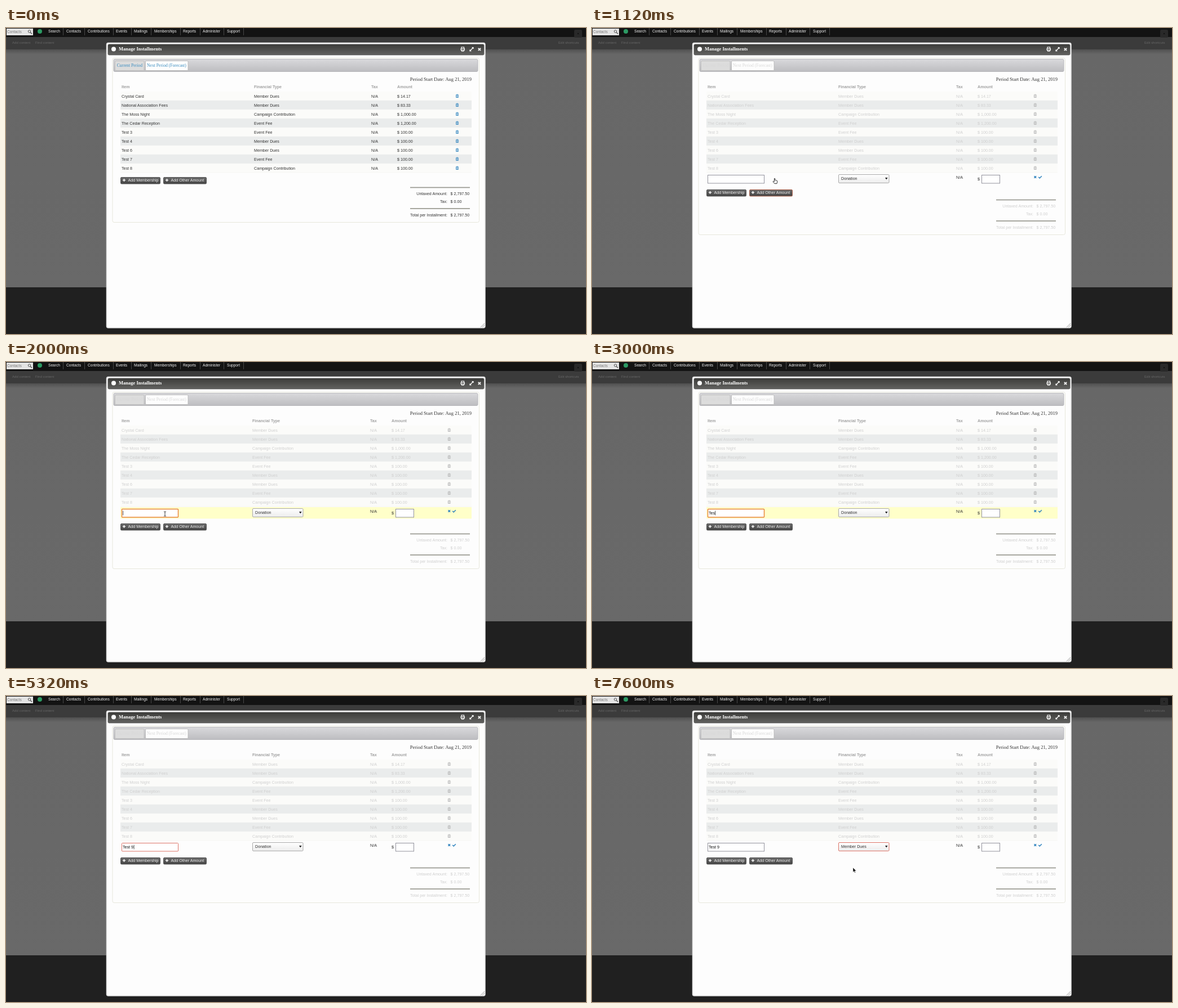
Recreate the animation shown at these times as an HTML page. Size 1029x544 px, loop 8 s.

```html
<!DOCTYPE html>
<html lang="en">
<head>
<meta charset="utf-8">
<title>Manage Installments</title>
<style>
  html, body { margin: 0; height: 100%; overflow: hidden; background: #202020; }
  svg { display: block; width: 100vw; height: 100vh; }
  text { font-family: "Liberation Sans", Arial, sans-serif; font-size: 7.15px; white-space: pre; }
  .serif { font-family: "Liberation Serif", "Times New Roman", serif; }
  .bold { font-weight: bold; }
</style>
</head>
<body>
<svg id="stage" viewBox="0 0 1029 544" preserveAspectRatio="none">
  <defs>
    <linearGradient id="titleFill" x2="0" y2="1"><stop stop-color="#3c3c3a"/><stop offset="1" stop-color="#626260"/></linearGradient>
    <linearGradient id="tabFill" x2="0" y2="1"><stop stop-color="#d9d9dc"/><stop offset="1" stop-color="#bdbdc0"/></linearGradient>
    <linearGradient id="buttonFill" x2="0" y2="1"><stop stop-color="#6c6c6c"/><stop offset="1" stop-color="#424242"/></linearGradient>
    <linearGradient id="selectFill" x2="0" y2="1"><stop stop-color="#fff"/><stop offset="1" stop-color="#ececec"/></linearGradient>
    <linearGradient id="pageFill" x2="0" y2="1"><stop stop-color="#505050"/><stop offset=".02" stop-color="#676767"/><stop offset="1" stop-color="#696969"/></linearGradient>
  </defs>
  <g id="backdrop"></g>
  <g id="dialog"></g>
  <g id="pointer"></g>
</svg>
<script>
const LOOP = 8000;
const BLUE = '#2a80bd', INK = '#333', FADED = '#cfcfcf';

const rows = [
  ['Crystal Card', 'Member Dues', '14.17'],
  ['National Association Fees', 'Member Dues', '83.33'],
  ['The Moss Night', 'Campaign Contribution', '1,000.00'],
  ['The Cedar Reception', 'Event Fee', '1,200.00'],
  ['Test 3', 'Event Fee', '100.00'],
  ['Test 4', 'Member Dues', '100.00'],
  ['Test 6', 'Member Dues', '100.00'],
  ['Test 7', 'Event Fee', '100.00'],
  ['Test 8', 'Campaign Contribution', '100.00'],
];

// [start, typed text, caret offset or -1 when hidden]
const typing = [
  [0, '', -1], [2000, '', 1], [2320, '', -1], [2600, 'T', 4.8], [2840, 'Te', 8.6],
  [3000, 'Tes', 12], [3400, 'Test', 14], [3960, 'Test ', 16], [4600, 'Test ', -1],
  [4760, 'Test 9', 20.3], [6320, 'Test 9', -1],
];

// [start, shape, x, y]
const pointerPath = [
  [0, '', 0, 0], [80, 'arrow', 440, 350], [150, 'arrow', 410, 325], [220, 'arrow', 378, 305],
  [290, 'arrow', 350, 287], [360, 'arrow', 332, 279], [520, 'hand', 325, 272],
  [1200, 'arrow', 324, 268], [1800, 'arrow', 314, 268], [1880, 'beam', 298, 270],
  [1960, 'beam', 282, 270], [2600, '', 0, 0], [5360, 'arrow', 380, 285],
  [5920, 'arrow', 432, 274], [5960, 'arrow', 461, 264], [7480, 'arrow', 462, 290],
  [7540, 'arrow', 463, 305],
];

const at = (steps, t) => steps.findLast(step => step[0] <= t);
const text = (x, y, value, { fill = INK, size = 7.15, cls = '', anchor = 'start' } = {}) =>
  `<text x="${x}" y="${y + size * .35}" class="${cls}" fill="${fill}" text-anchor="${anchor}" style="font-size:${size}px">${value}</text>`;
const box = (x, y, w, h, fill, stroke = 'none', r = 0, line = 1) =>
  `<rect x="${x}" y="${y}" width="${w}" height="${h}" rx="${r}" fill="${fill}" stroke="${stroke}" stroke-width="${line}"/>`;
const path = (d, stroke, width = 1, fill = 'none') =>
  `<path d="${d}" fill="${fill}" stroke="${stroke}" stroke-width="${width}"/>`;
const place = (x, y, content) => `<g transform="translate(${x} ${y})">${content}</g>`;
const dot = (x, y, fill) => `<circle cx="${x}" cy="${y}" r="4" fill="${fill}"/>`;
const cross = (x, y, r, color, width) => place(x, y, path(`M${-r} ${-r}L${r} ${r}M${r} ${-r}L${-r} ${r}`, color, width));

const trash = (x, y, color) => place(x, y,
  path('M-2.6-1.9H2.6M-1-2.8H1', color) + path('M-1.9-1V2.5H1.9V-1M0-1V2', color, .9));

const pointers = {
  '': '',
  arrow: path('M0 0V8.2L1.9 6.5 3.2 9.3 4.5 8.7 3.2 6H5.8Z', '#fff', .5, '#111'),
  beam: path('M-2-4H-.5L0-3.5.5-4H2M0-3.5V3.5M-2 4H-.5L0 3.5.5 4H2', '#222', .9),
  hand: path('M-1.6-4.4Q-.8-5.2-.2-4.3V-1.5L3-.8Q4-.4 3.8.8L3 4.6H-1.2L-4 1.2Q-3.8 0-2.6.6L-1.6 1.3Z', '#222', .9, '#fff'),
};

function button(x, y, w, label, focused) {
  return box(x + .5, y + .5, w - 1, 11.5, 'url(#buttonFill)', focused ? '#b0644e' : '#555', 1.5)
    + path(`M${x + 4} ${y + 5.5}h5m-2.5-2.5v5`, '#fff', 1.4)
    + text(x + 13.5, y + 5.8, label, { fill: '#eee' });
}

function drawBackdrop() {
  const menu = [['Search', 75, 101], ['Contacts', 107, 139], ['Contributions', 145, 190], ['Events', 195, 222],
    ['Mailings', 227, 257], ['Memberships', 263, 309], ['Reports', 314, 344], ['Administer', 349, 386], ['Support', 392, 421]];
  const faint = { fill: '#666', size: 6.05 };
  return box(0, 0, 1029, 16, '#131313') + box(0, 16, 1029, 22, '#3b3b3b')
    + box(0, 38, 1029, 423, 'url(#pageFill)') + box(0, 461, 1029, 83, '#202020')
    + box(1, 1, 47, 12, '#e4e4e4') + text(2, 7, 'Contacts', { fill: '#777', size: 6.5 })
    + '<circle cx="41.5" cy="6" r="2.2" fill="none" stroke="#555"/>' + path('M43 7.5L46 10.5', '#555', 1.3)
    + dot(60, 6, '#2c9a63')
    + menu.map(([label, x, edge]) => text(x, 6, label, { fill: '#f2f2f2', size: 6.58 }) + box(edge, 0, .8, 13, '#555')).join('')
    + text(11, 25.5, 'Add content', faint) + text(52, 25.5, 'Find content', faint) + text(980, 25.5, 'Edit shortcuts', faint)
    + box(1008, 3, 14, 14, '#292929', 'none', 2) + cross(1015, 10, 1.3, '#111', 1);
}

function drawFrame(period) {
  return box(178.5, 26.5, 671.5, 506.5, '#fdfdfd', '#e2e2e2', 3, 1.5)
    + box(181, 29, 667, 19, 'url(#titleFill)', '#4a4a48', 2, .7)
    + dot(191, 37.5, '#fff') + text(200, 37, 'Manage Installments', { fill: '#fff', size: 8.5, cls: 'serif bold' })
    + path('M808 36V34h4.5v2M807.2 40V36.5h6.2V40M808.5 39h3.6v2.2h-3.6Z', '#fff', 1.2)
    + path('M823 41L829 34.5M826.5 34.5H829V37M823 38.5V41H825.5', '#fff', 1.2)
    + cross(840, 38, 2.2, '#fff', 1.7)
    + path('M842 532L849 525M845 532L849 528', '#999', .9)
    + text(826, 91, period, { size: 8.53, cls: 'serif', anchor: 'end' });
}

function drawEditRow(t) {
  const [, typed, caret] = at(typing, t);
  const hovered = t >= 1200 && t < 5320 || t >= 5920 && t < 7600;
  const editing = t >= 2000 && t < 6320;
  const chosen = t >= 7600;
  const ring = hovered ? '#e8863c' : '#dd7468';
  return box(203, 258, 623, 20.5, hovered ? '#ffffc9' : '#fdfdfd')
    + box(205.5, 261.5, 100, 14.5, '#fff', editing ? ring : '#92929c', editing ? 1 : 0, editing && hovered ? 1.5 : 1)
    + text(207, 268.5, typed, { fill: '#111' })
    + (caret < 0 ? '' : box(206.4 + caret, 264.5, .7, 8, '#111'))
    + box(437.5, 260.5, 89.5, 15, 'url(#selectFill)', chosen ? '#dd7468' : '#aaa', 1.5)
    + text(442, 267.5, chosen ? 'Member Dues' : 'Donation')
    + path('M520 266H524.6L522.3 269.6Z', 'none', 0, '#222')
    + text(646, 265, 'N/A') + text(684, 268.5, '$')
    + box(691.5, 261.5, 32, 14.5, '#fff', '#92929c')
    + cross(786.3, 265, 1.8, BLUE, 1.5) + path('M792.2 265L794.2 267 797.8 263.2', BLUE, 1.5);
}

function drawDialog(t) {
  const disabled = t >= 920;
  const open = t >= 1080;
  const shift = open ? 22 : 0;
  const fill = disabled ? FADED : INK;
  const link = disabled ? '#d8d8d8' : '#3b8dc0';
  const [typeX, taxX, amountX, trashX] = open ? [437, 646, 684, 786.3] : [440, 648, 694, 800.5];
  const tab = { fill: link, size: 7.66, cls: 'serif' };
  const head = { fill: '#a0a0a0', cls: 'bold' };

  const table = rows.map(([item, type, amount], i) => {
    const y = 121 + 16 * i;
    return box(203, y - 8, 623, 16, i % 2 ? '#eaecec' : '#fbfbf9')
      + path(`M203 ${y + 8}H826`, '#efefe8', .5)
      + [[205, item], [typeX, type], [taxX, 'N/A'], [amountX, '$ ' + amount]].map(([x, s]) => text(x, y, s, { fill })).join('')
      + trash(trashX, y, disabled ? '#b4b4b4' : BLUE);
  }).join('');

  const totals = [['Untaxed Amount:', '$ 2,797.50', 294.5], ['Tax:', '$ 0.00', 308], ['Total per Installment:', '$ 2,797.50', 332]]
    .map(([label, value, y]) => text(783, y + shift, label, { fill, anchor: 'end' }) + text(788.5, y + shift, value, { fill })).join('');

  return drawFrame('Period Start Date: Aug 21, 2019')
    + box(189, 53.5, 650.5, 292 + shift, 'none', '#e7e7dc', 3)
    + box(191, 55.5, 646, 22, 'url(#tabFill)', '#adadb0', 2, .8)
    + box(193.5, 58.5, 51.5, 17, '#dcdcdc', '#bcbcbc', 1.5, .8) + box(247.5, 58.5, 75.5, 17, '#fdfdfd', '#b4b4b4', 1.5, .8)
    + text(196.7, 66, 'Current Period', tab) + text(250, 66, 'Next Period (Forecast)', tab)
    + [[205, 'Item'], [typeX, 'Financial Type'], [taxX, 'Tax'], [amountX, 'Amount']].map(([x, s]) => text(x, 104.5, s, head)).join('')
    + table + (open ? drawEditRow(t) : '')
    + button(203, 265 + shift, 71, 'Add Membership')
    + button(279, 265 + shift, 77, 'Add Other Amount', disabled && t < 1960)
    + [283.5, 321].map(y => box(717, y + shift - .8, 106, 1.7, '#989890')).join('') + totals;
}

function drawPointer(t) {
  const [, shape, x, y] = at(pointerPath, t);
  return place(x, y, pointers[shape]);
}

const shown = {};
function show(id, markup) {
  if (shown[id] !== markup) document.getElementById(id).innerHTML = shown[id] = markup;
}

function tick() {
  const t = performance.now() % LOOP;
  show('dialog', drawDialog(t));
  show('pointer', drawPointer(t));
  requestAnimationFrame(tick);
}

show('backdrop', drawBackdrop());
tick();
</script>
</body>
</html>
```
